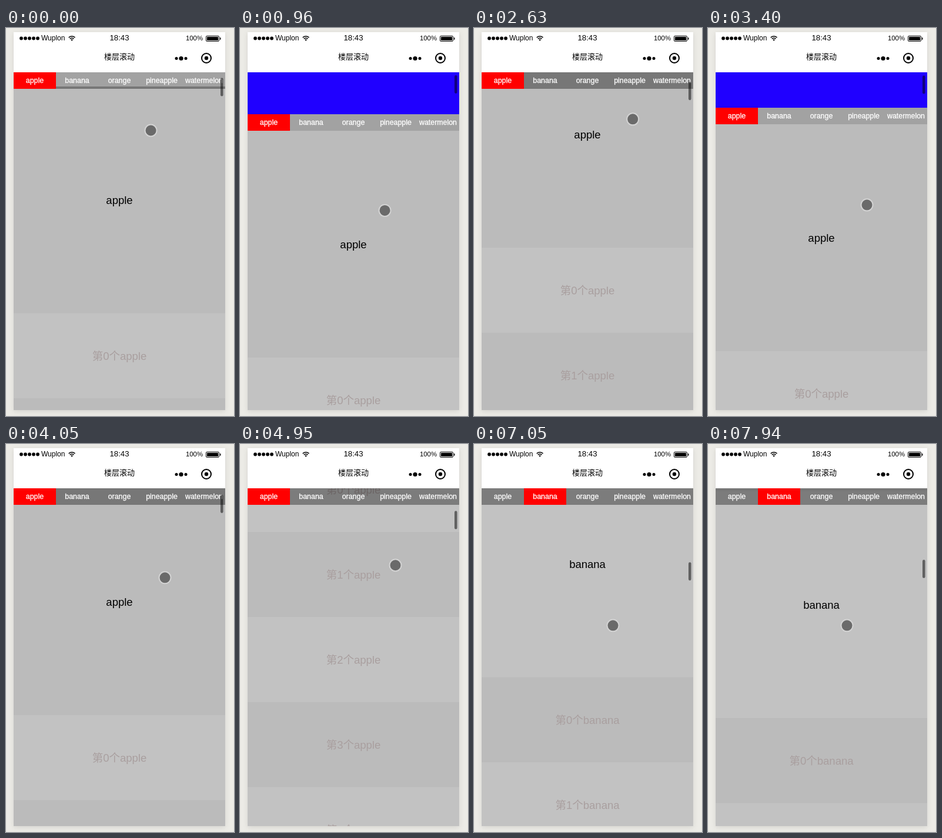
Animation of 388x657 px, one loop 8 s. Source, as an HTML page:

```html
<!DOCTYPE html>
<html lang="zh">
<head>
<meta charset="utf-8">
<title>楼层滚动</title>
<style>
  html, body { margin: 0; width: 100%; height: 100%; overflow: hidden; background: #ecebe6; }
  svg { display: block; width: 388px; height: 657px; }
  text { font-family: "Liberation Sans", "Noto Sans CJK SC", "Noto Sans CJK", sans-serif; text-anchor: middle; }
  .phone { filter: drop-shadow(0 2px 4px rgba(0, 0, 0, .1)); }
  .floor { font-size: 18.5px; }
  .item { font-size: 18.5px; fill: #a99f9f; }
  .tab { font-size: 12.4px; fill: #fff; stroke: #fff; stroke-width: .3px; }
</style>
</head>
<body>
<svg viewBox="0 0 388 657">
  <defs>
    <clipPath id="view"><rect x="13" y="75" width="360" height="572"/></clipPath>
  </defs>
  <rect class="phone" x="13" y="7" width="360" height="640" fill="#fff"/>

  <g id="signal"></g>
  <text x="60" y="21" font-size="12" style="text-anchor:start">Wuplon</text>
  <g fill="none" stroke="#000" stroke-width="1.6">
    <path d="M106.7 16.2a7.6 7.6 0 0 1 10.8 0M108.7 18.4a4.8 4.8 0 0 1 6.8 0"/>
    <path d="M110.3 19.8a2.6 2.6 0 0 1 3.6 0L112.1 22z" fill="#000" stroke="none"/>
  </g>
  <text x="193" y="21" font-size="13.2">18:43</text>
  <text x="320.5" y="21" font-size="11.4">100%</text>
  <rect x="340.5" y="13.5" width="22" height="9" rx="1.5" fill="none" stroke="#000"/>
  <rect x="342" y="15" width="19" height="6" rx=".5"/>
  <path d="M364 16h.3a1.2 1.2 0 0 1 1.2 1.2v1.6a1.2 1.2 0 0 1-1.2 1.2h-.3z"/>

  <text x="193" y="52.5" font-size="13">楼层滚动</text>
  <circle cx="290" cy="51.5" r="2.5"/>
  <circle cx="298" cy="51.5" r="3.6"/>
  <circle cx="306" cy="51.5" r="2.5"/>
  <circle cx="341" cy="51" r="8" fill="none" stroke="#000" stroke-width="2"/>
  <circle cx="341" cy="51" r="3.2"/>

  <g clip-path="url(#view)">
    <g id="page"></g>
    <g id="nav"></g>
    <rect id="thumb" x="365" width="4.6" height="31" rx="2.3" fill-opacity=".5"/>
  </g>
  <circle id="cursor" r="10" fill="#6a6a6a" stroke="#d3d3d3" stroke-width="2"/>
</svg>
<script>
const LOOP = 8000;
const TOP = 75, LEFT = 13, WIDTH = 360;
const BANNER = 96, NAV = 28, HEAD = 384, ROW = 144, ROWS = 10, TAB = 72;
const FLOOR = HEAD + ROW * ROWS;
const FRUITS = ['apple', 'banana', 'orange', 'pineapple', 'watermelon'];
const TURNS = [1440, 1920, 2630, 3440, 4650];
const SWING = 176;

const $ = id => document.getElementById(id);
const ramp = (t, from, to) => Math.min(1, Math.max(0, (t - from) / (to - from)));
const ease = (t, from, to) => (1 - Math.cos(Math.PI * ramp(t, from, to))) / 2;
const bell = (t, from, to) => Math.sin(Math.PI * ramp(t, from, to)) ** 2;

function add(parent, tag, attrs, text) {
  const el = document.createElementNS('http://www.w3.org/2000/svg', tag);
  for (const key in attrs) el.setAttribute(key, attrs[key]);
  if (text) el.textContent = text;
  return parent.appendChild(el);
}

function band(y, height, fill) {
  add($('page'), 'rect', { x: LEFT, y, width: WIDTH, height, fill });
}

function build() {
  for (let i = 0; i < 5; i++) add($('signal'), 'circle', { cx: 26 + i * 7, cy: 17.5, r: 2.9 });

  band(TOP, BANNER, '#2000ff');
  band(TOP + BANNER, NAV, '#fff');
  let y = TOP + BANNER + NAV, count = 0;
  const block = (height, cls, label) => {
    band(y, height, count++ % 2 ? '#c2c2c2' : '#bbb');
    add($('page'), 'text', { x: 193, y: y + height / 2 + 6.5, class: cls }, label);
    y += height;
  };
  for (const fruit of FRUITS) {
    block(HEAD, 'floor', fruit);
    for (let i = 0; i < ROWS; i++) block(ROW, 'item', `第${i}个${fruit}`);
  }

  return FRUITS.map((fruit, i) => {
    const x = LEFT + i * TAB;
    const tab = add($('nav'), 'rect', { x, y: 0, width: TAB, height: NAV, 'shape-rendering': 'crispEdges' });
    add($('nav'), 'text', { x: x + TAB / 2, y: 18.3, class: 'tab' }, fruit);
    return tab;
  });
}

// Nudge and pull down, then swing between the turning times
function dragAt(t) {
  let y = 100 + 30 * ease(t, 60, 420) + 81 * ease(t, 600, 1260) - 155 * bell(t, 600, 1260);
  for (let i = 1; i < TURNS.length; i++) {
    y += (i % 2 ? -SWING : SWING) * ease(t, TURNS[i - 1], TURNS[i]);
  }
  return y;
}

// A slowing fling, then one step back and one forward
function flingAt(t) {
  return 1805 * ramp(t, 4770, 6690) ** .6742 - 122 * ease(t, 6990, 7530) + 49 * ease(t, 7710, 7940);
}

// The pointer moves against the drag, takes a new grip and flicks
function pointerAt(t) {
  return {
    x: 246.5 + 24 * ease(t, 1100, 2750) - 34 * ease(t, 4600, 5870),
    y: 329.5 - .83 * dragAt(t) - 73 * (1 - ease(t, 60, 420))
      + 153 * ease(t, 4300, 4650) - 150 * bell(t, 4770, 5356)
  };
}

const tabs = build();

function draw(t) {
  const scroll = Math.round(dragAt(t) + flingAt(t));
  const active = Math.max(0, Math.floor((scroll - BANNER) / FLOOR));
  $('page').setAttribute('transform', `translate(0 ${-scroll})`);
  $('nav').setAttribute('transform', `translate(0 ${TOP + Math.max(0, BANNER - scroll)})`);
  tabs.forEach((tab, i) => {
    tab.setAttribute('fill', i === active ? '#f00' : '#000');
    tab.setAttribute('fill-opacity', i === active ? 1 : .365);
  });
  $('thumb').setAttribute('y', 78.4 + scroll * .0605);
  const pointer = pointerAt(t);
  $('cursor').setAttribute('cx', pointer.x);
  $('cursor').setAttribute('cy', pointer.y);
}

const start = performance.now();
function tick() {
  draw((performance.now() - start) % LOOP);
  requestAnimationFrame(tick);
}
tick();
</script>
</body>
</html>
```
